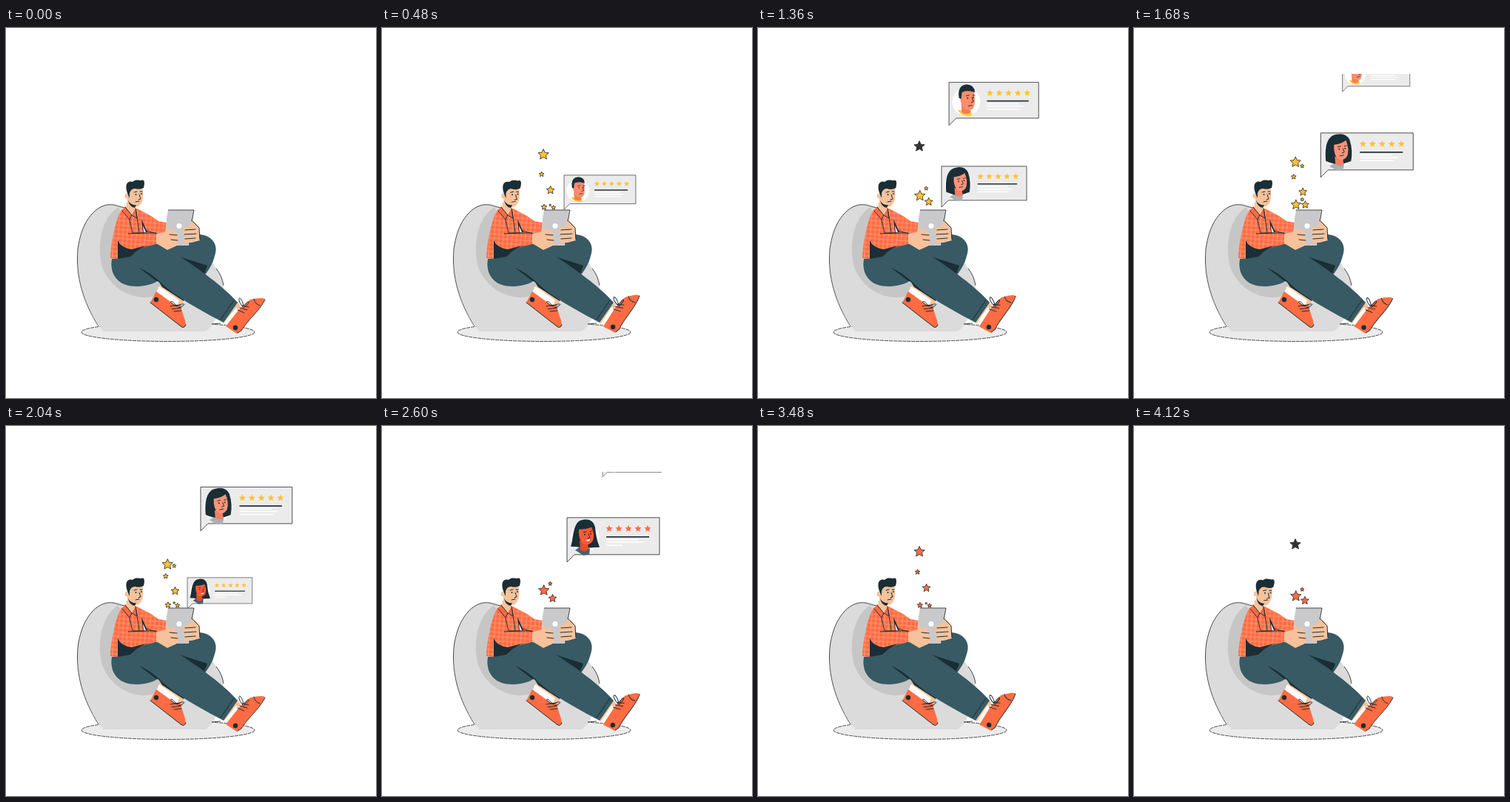
Animation of 500x500 px, one loop 4.16 s. Source, as an HTML page:

```html
<!DOCTYPE html>
<html lang="en">
<head>
<meta charset="utf-8">
<title>Reviews</title>
<style>
html, body { margin: 0; width: 100%; height: 100%; overflow: hidden; background: #fff; }
svg { display: block; width: 100vw; height: 100vh; }
.ink { fill: #1b2e35; }
.skin { fill: #f7c29b; }
.shirt { fill: #ff6c43; }
.denim { fill: #375a64; }
.line { fill: none; stroke: #1b2e35; stroke-width: 1; stroke-linecap: round; stroke-linejoin: round; }
.edge { stroke: #222; stroke-width: .8; }
</style>
</head>
<body>
<svg viewBox="0 0 500 500">
  <defs>
    <clipPath id="top"><path d="M0 62H500V500H0Z"/></clipPath>
    <pattern id="grid" width="6" height="6" patternUnits="userSpaceOnUse" patternTransform="rotate(4)">
      <path d="M0 3H6M3 0V6" stroke="#ffa78c" stroke-width=".7"/>
    </pattern>
    <path id="torso" d="M156 246L163 242L177 244L196 254L206 261L217 263L219 272L214 277L204 278L203 292L170 300L152 312L141 311C142 288 149 256 156 246Z"/>
    <g id="face1">
      <path fill="#ffc928" d="M12 39L18 45Q25 48 32 46L30 38Z"/>
      <path fill="#f47a59" d="M17 30L18 42Q24 46 30 42L29 32Z"/>
      <path fill="#ff8c6b" d="M15 12L34 11Q38 27 34 36Q28 42 20 36Q15 29 15 12Z"/>
      <path class="ink" d="M14 22Q11 4 25 3Q36 4 36 14Q25 10 18 14L17 23Z"/>
      <path class="line" d="M24 19L28 18M33 18L36 18M32 21L34 27L31 28M27 33L32 32"/>
      <circle class="ink" cx="26" cy="22" r="1"/><circle class="ink" cx="34" cy="21" r="1"/>
    </g>
    <g id="face2">
      <path fill="#a9b1b4" d="M12 45L19 40L32 42L30 50L22 51Z"/>
      <path class="ink" d="M7 38C5 18 9 4 21 2Q34 -1 39 9Q44 24 41 38Q24 46 7 38Z"/>
      <path fill="#f47e66" d="M19 32L20 42Q26 47 31 42L30 34Z"/>
      <path fill="#ff9479" d="M18 16Q28 15 34 10Q39 21 36 31Q31 39 23 35Q17 28 18 16Z"/>
      <path class="line" d="M23 19L27 18M32 18L35 17M30 21L32 26L29 27M26 31L31 30"/>
      <circle class="ink" cx="25" cy="22" r="1"/><circle class="ink" cx="33" cy="21" r="1"/>
    </g>
    <g id="face3">
      <path fill="#44626c" d="M11 44L18 39L31 42L30 50L22 51Z"/>
      <path class="ink" d="M5 39C9 30 7 5 21 3Q35 0 38 13Q39 27 44 40L28 41Z"/>
      <path fill="#e94a2b" d="M17 31L18 43Q24 49 29 42L28 34Z"/>
      <path fill="#ff5a38" d="M16 16Q26 16 33 13Q38 22 35 31Q30 39 21 35Q15 28 16 16Z"/>
      <path class="line" d="M22 20L26 19M31 19L34 18M29 22L31 27L28 28"/>
      <circle class="ink" cx="24" cy="23" r="1"/><circle class="ink" cx="32" cy="22" r="1"/>
      <path d="M25 31L31 29Q31 33 25 31" fill="#fff"/>
    </g>
  </defs>

  <!-- Seat -->
  <ellipse class="edge" cx="219" cy="411" rx="117" ry="12.5" fill="#ebebeb" stroke-dasharray="5 1"/>
  <path fill="#dbdbdb" d="M131 410C106 375 94 338 97 300C101 262 122 235 146 239C190 249 270 290 293 340C297 365 286 398 270 410Z"/>
  <path class="edge" fill="none" d="M125 403C104 370 94 335 97 300C101 262 122 235 146 239L160 243M284 325Q292 335 294 348M278 400L290 399"/>
  <path fill="#c6c6c6" d="M152 242C130 255 123 290 129 319C136 347 168 371 202 362L213 345L170 290Z"/>

  <g id="stars"></g>
  <g id="cards" clip-path="url(#top)"></g>

  <!-- Lower body -->
  <path class="denim" d="M215 300L262 279C281 281 287 295 282 308C279 320 274 327 268 335L225 330Z"/>
  <path class="ink" d="M228 307L272 321L267 335L246 324Z"/>
  <path class="skin" d="M210 344L242 364L236 377L204 355Z"/>
  <path fill="#fff" d="M207 349L234 368L230 378L202 360Z"/>
  <path class="shirt" d="M203 356L195 371L236 403Q241 407 243 401L242 395L235 374L228 374Z"/>
  <path class="line" d="M195 371L236 403Q241 407 243 401M222 376L236 374M224 380L237 378M227 383L237 382M231 376C218 371 222 364 231 376C241 370 246 374 233 378"/>
  <circle class="ink" cx="203" cy="367" r="3.2"/>
  <g id="foot">
    <path class="skin" d="M312 369L317 376L300 402L291 396Z"/>
    <path fill="#fff" d="M311 378L315 382L302 404L294 399Z"/>
    <path class="shirt" d="M316 379L297 403L312 413L318 409C327 394 343 382 350 367Q349 363 330 367L321 375Z"/>
    <path class="line" d="M313 412L318 409C327 394 343 382 350 367" stroke-dasharray="2 1"/>
    <path class="line" d="M313 381L322 385M316 378L326 381M319 375L328 377M320 377C310 366 317 357 321 376C328 366 333 369 321 378M335 366Q336 373 343 375"/>
    <circle class="ink" cx="310" cy="405" r="3.2"/>
  </g>
  <path class="ink" d="M204 339L212 344L243 364L240 369L211 350Z"/>
  <path class="denim" d="M143 312C160 312 175 294 192 291C205 289 218 296 232 307C260 325 295 350 313 371L294 398C262 381 225 361 206 341C196 349 170 353 155 344C144 336 141 325 143 312Z"/>
  <path class="ink" d="M180 324Q196 331 209 344L202 341Z"/>
  <path class="line" d="M308 368L290 394"/>

  <!-- Upper body -->
  <use href="#torso" class="shirt"/>
  <use href="#torso" fill="url(#grid)"/>
  <path class="ink" d="M151 287Q155 297 170 299L197 292Q180 296 168 309L151 312Z"/>
  <path class="ink" d="M183 258L191 276L185 276Z"/>
  <path fill="#fff" d="M185 267L189 276L186 276Z"/>
  <path class="line" d="M164 247L171 277L203 277M165 278L187 277M176 249L180 276M190 274L203 278"/>
  <path class="skin" d="M163 235L175 241L174 249L169 255L162 244Z"/>
  <path class="shirt" d="M161 241L170 253L167 259L157 247ZM175 244L177 257L170 253Z"/>
  <path class="line" d="M161 242L170 253L167 259L157 247M175 244L177 257L170 253"/>
  <g id="head">
    <circle class="skin" cx="164" cy="227" r="3.5"/>
    <path class="skin" d="M164 217L184 215C187 228 185 237 179 241C172 244 166 240 164 234Z"/>
    <path class="ink" d="M164 223C160 212 164 206 171 208C175 204 180 206 183 206C187 204 188 209 186 216Q181 219 174 217Q169 217 167 223L167 230Z"/>
    <path class="ink" d="M165 233Q169 240 176 239L174 243Q167 242 165 233Z"/>
    <path class="line" d="M173 222L177 221M181 221L184 221M180 225L182 231L179 232M175 235L180 234" stroke-width=".7"/>
    <circle class="ink" cx="175.5" cy="225" r="1"/><circle class="ink" cx="183" cy="224" r="1"/>
  </g>

  <!-- Tablet and hands -->
  <path fill="#c9c9cc" d="M219 246H254L247 294H216Q214 270 219 246Z"/>
  <path class="edge" d="M219 246H254"/>
  <path class="edge" fill="none" d="M254 246L251 262"/>
  <circle cx="234" cy="267.500" r="3.500" fill="#fff"/>
  <path class="skin" d="M203 279L215 275L218 271L229 274Q232 277 231 282L233 289Q233 293 229 295L218 300L203 291Z"/>
  <path class="skin" d="M251 260Q256 262 261 270L262 287L251 290L241 290Q238 287 242 284L239 279L241 274L239 270L249 267Z"/>
  <path class="line" stroke-width=".7" d="M221 279L231 280M223 286L232 287M242 273L256 272M241 279L257 278M242 285L256 284M251 260L261 270L262 286"/>
</svg>
<script>
const LOOP = 4160;
const get = id => document.getElementById(id);

// Piecewise linear value at v
function ramp(xs, ys, v) {
  let i = 1;
  while (i < xs.length - 1 && v > xs[i]) i++;
  const k = (v - xs[i - 1]) / (xs[i] - xs[i - 1]);
  return ys[i - 1] + (ys[i] - ys[i - 1]) * Math.max(0, Math.min(1, k));
}

function star(x, y, r, fill, line = "none") {
  let pts = "";
  for (let i = 0; i < 10; i++) {
    const a = i * Math.PI / 5 - Math.PI / 2, d = i % 2 ? r * .47 : r;
    pts += `${(x + d * Math.cos(a)).toFixed(2)},${(y + d * Math.sin(a)).toFixed(2)} `;
  }
  return `<polygon points="${pts}" fill="${fill}" stroke="${line}" stroke-width=".8"/>`;
}

// Start and duration of each burst
const bursts = [[40, 510], [450, 640], [820, 560], [1200, 640], [1600, 640],
  [2010, 590], [2410, 640], [2920, 640], [3450, 690], [3980, 640]];
const phase = [0, .125, .22, .25, .3, .61, .69, .92, .96];
const rise = {
  big: [244, 239, 230, 227, 222, 194, 187, 166, 160],
  tiny: [244, 232, 221, 217, 213, 193, 189, 180, 178],
  mid: [245, 239, 236, 235, 233, 225, 223, 218, 217]
};

function burst(p, color) {
  if (p <= 0 || p >= 1) return "";
  const y = name => ramp(phase, rise[name], p);
  const grow = Math.min(1, .3 + p * 5);
  let out = star(219 - p, y("big"), 7.5 * grow, p > .95 ? "#333" : color, "#222");
  if (p < .95) out += star(232 - 5 * p, y("mid"), 5.7 * grow, color, "#222");
  if (p < .8) out += star(227.3, y("tiny"), 2.8 * grow, color, "#222");
  if (p > .35 && p < .95) {
    const r = 3.6 * Math.min(1, (p - .35) * 6);
    out += star(216.5 - p, ramp([.35, .61, .69, .92], [222, 207, 203, 196], p), r, color, "#222");
  }
  return out;
}

const ages = [200, 440, 560, 840, 1000, 1240, 1360, 1400, 1800];
const lefts = [240, 245, 248, 248, 250, 255, 258, 262, 290];
const bases = [246, 240, 233, 198, 174, 132, 122, 117, 62.5];
const sizes = [.1, .7, .92, 1, 1, .99, .97, .95, .635];

function card(n, t, color) {
  const age = t - n * 800;
  if (age < 200 || age > 1820) return "";
  const shift = n === 1 ? ramp([560, 1240], [0, 8], age) : 0;
  const x = ramp(ages, lefts, age) + shift;
  const y = ramp(ages, bases, age), s = ramp(ages, sizes, age);
  let rating = "";
  for (let i = 0; i < 5; i++) rating += star(57 + 13 * i, 15, 4.8, color);
  return `<g transform="translate(${x} ${y}) scale(${s}) translate(0 -50)">
    <path class="edge" fill="#ebebeb" d="M0 0H125V50H10L0 60Z"/>
    <circle cx="24" cy="27" r="19.500" fill="#fff"/>
    <use href="#face${n + 1}"/>${rating}
    <path d="M53 26H111" stroke="#263238" stroke-width="1.800"/>
    <path d="M53 30H97M53 33.500H104M53 37.500H${n === 2 ? 75 : 99}" stroke="#fff" stroke-width="1.500"/>
  </g>`;
}

function draw(now) {
  const t = now % LOOP;
  const color = t < 2260 ? "#ffc233" : "#ff6c43";
  get("stars").innerHTML = bursts.map(([start, len]) => burst((t - start) / len, color)).join("");
  get("cards").innerHTML = [0, 1, 2].map(n => card(n, t, color)).join("");
  const tap = Math.max(0, Math.sin((t - 160) / 1040 * 2 * Math.PI));
  get("foot").setAttribute("transform", `rotate(${-6.5 * tap} 302 384)`);
  const nod = Math.max(0, Math.cos((t - 840) / 3280 * 2 * Math.PI)) ** 4;
  get("head").setAttribute("transform", `rotate(${5 * nod} 168 242)`);
}

const begin = performance.now();
function tick() {
  draw(performance.now() - begin);
  requestAnimationFrame(tick);
}
tick();
</script>
</body>
</html>
```
